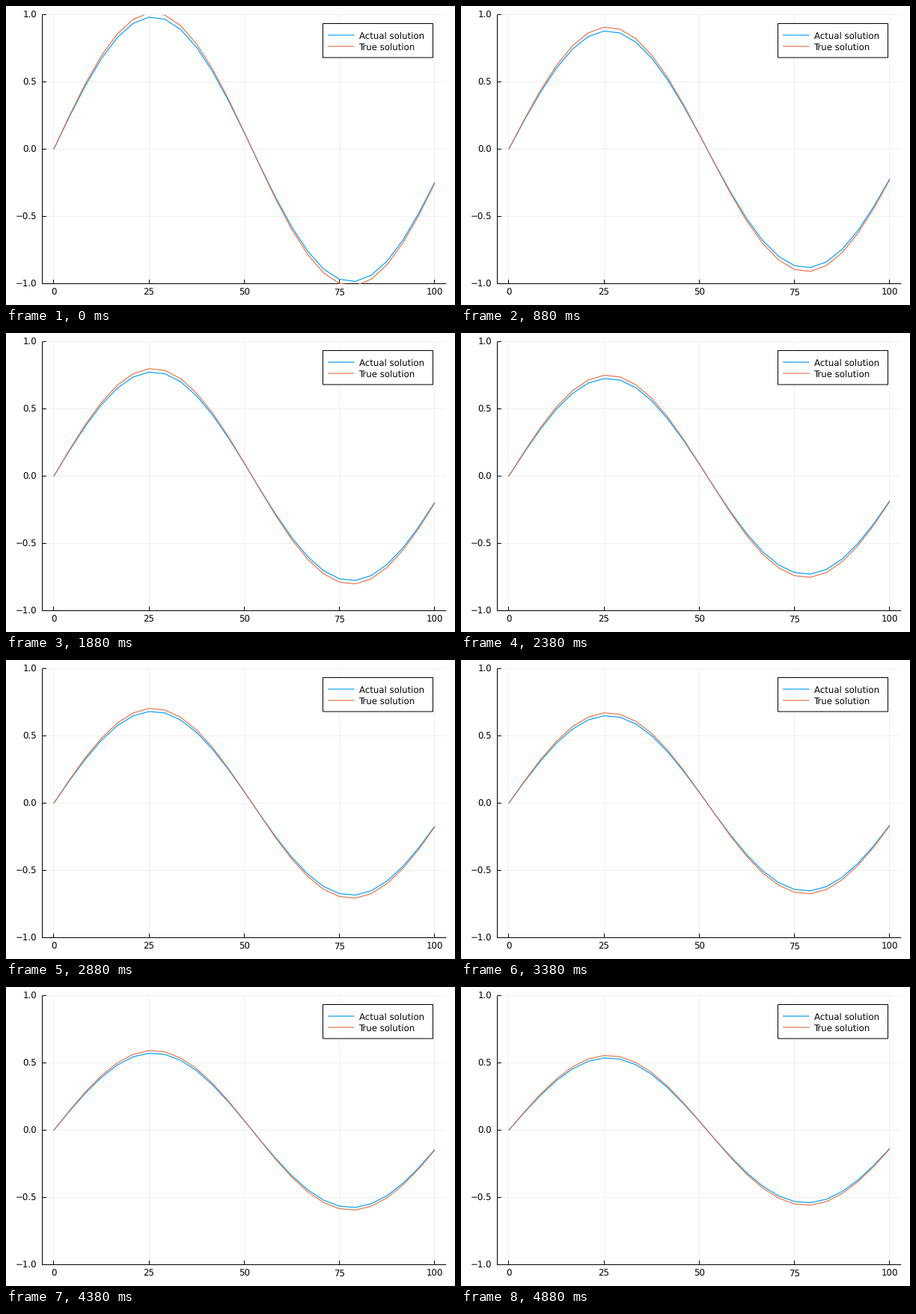
Animation, 600 px wide and 400 px high, one loop 5010 ms. Source, as a matplotlib script:

```python
import numpy as np
import matplotlib.pyplot as plt
from matplotlib.animation import FuncAnimation
from matplotlib.patches import Rectangle

plt.rcParams.update({"font.family": "DejaVu Sans", "text.hinting": "none"})

DPI = 100
PT = 72 / DPI  # points per pixel
W, H = 600, 400
LEFT, RIGHT, TOP, BOTTOM = 48.5, 588.2, 11.8, 371.6
BLUE, RED = "#009AFA", "#E36F47"
FRAMES, LOOP = 40, 5010

# Heat equation on a periodic grid: explicit scheme against exact decay
CELLS, COURANT = 25, 0.25
STEP = 2 * np.pi / CELLS
GROWTH = 1 - 2 * COURANT * (1 - np.cos(STEP))
RATE = COURANT * STEP**2

fig = plt.figure(figsize=(W / DPI, H / DPI), dpi=DPI, facecolor="white")
ax = fig.add_axes([0, 0, 1, 1])
ax.set_xlim(0, W)
ax.set_ylim(H, 0)
ax.axis("off")


def px(x):
    return LEFT + (x + 3) / 106 * (RIGHT - LEFT)


def py(y):
    return (TOP + BOTTOM) / 2 - y * (BOTTOM - TOP) / 2


def mid(v):
    return np.floor(v) + 0.5


def stroke(xs, ys, color="black", width=1.0, **kw):
    return ax.plot(xs, ys, color=color, lw=width * PT, snap=False,
                   solid_capstyle="butt", **kw)[0]


def label(x, y, s, ha):
    ax.text(x, y + 4.4, s, ha=ha, va="baseline", fontsize=11.8 * PT)


def draw_axes():
    base, side = mid(BOTTOM), mid(LEFT)
    xticks = range(0, 101, 25)
    yticks = np.linspace(-1, 1, 5)
    for x in xticks:
        stroke([mid(px(x))] * 2, [TOP, base], alpha=0.06, zorder=1)
    for y in yticks:
        stroke([side, RIGHT], [mid(py(y))] * 2, alpha=0.06, zorder=1)
    stroke([side - 0.5, RIGHT], [base] * 2)
    stroke([side] * 2, [TOP, base + 0.5])
    for x in xticks:
        stroke([mid(px(x))] * 2, [base, base - 5.5])
        label(px(x), 382.6, str(x), "center")
    for y in yticks:
        stroke([side, side + 5.5], [mid(py(y))] * 2)
        label(41, py(y), f"{y:.1f}".replace("-", "\u2212"), "right")


def draw_legend():
    ax.add_patch(Rectangle((423.5, 23.5), 147, 45.5, fc="white", ec="black",
                           lw=PT, snap=False, zorder=5))
    rows = [(39, "Actual solution", BLUE), (54, "True solution", RED)]
    for y, name, color in rows:
        stroke([430, 465.5], [y, y], color, 1.15, zorder=6)
        label(471.5, y, name, "left")
    for text in ax.texts:
        text.set_zorder(6)


draw_axes()
draw_legend()

cells = np.arange(CELLS)
wave = np.sin(STEP * cells)
xs = px(cells * 100 / (CELLS - 1))
actual = stroke(xs, py(wave), BLUE, 1.15, zorder=3)
true = stroke(xs, py(wave), RED, 1.15, zorder=4)
for line in (actual, true):
    line.set_clip_path(Rectangle((LEFT, TOP), RIGHT - LEFT, BOTTOM - TOP,
                                 transform=ax.transData))


def update(n):
    actual.set_ydata(py(wave * GROWTH ** (n + 1)))
    true.set_ydata(py(wave * np.exp(-RATE * (n - 1))))
    return actual, true


anim = FuncAnimation(fig, update, frames=FRAMES, interval=LOOP / FRAMES,
                     repeat=True, repeat_delay=0)
plt.show()
```
